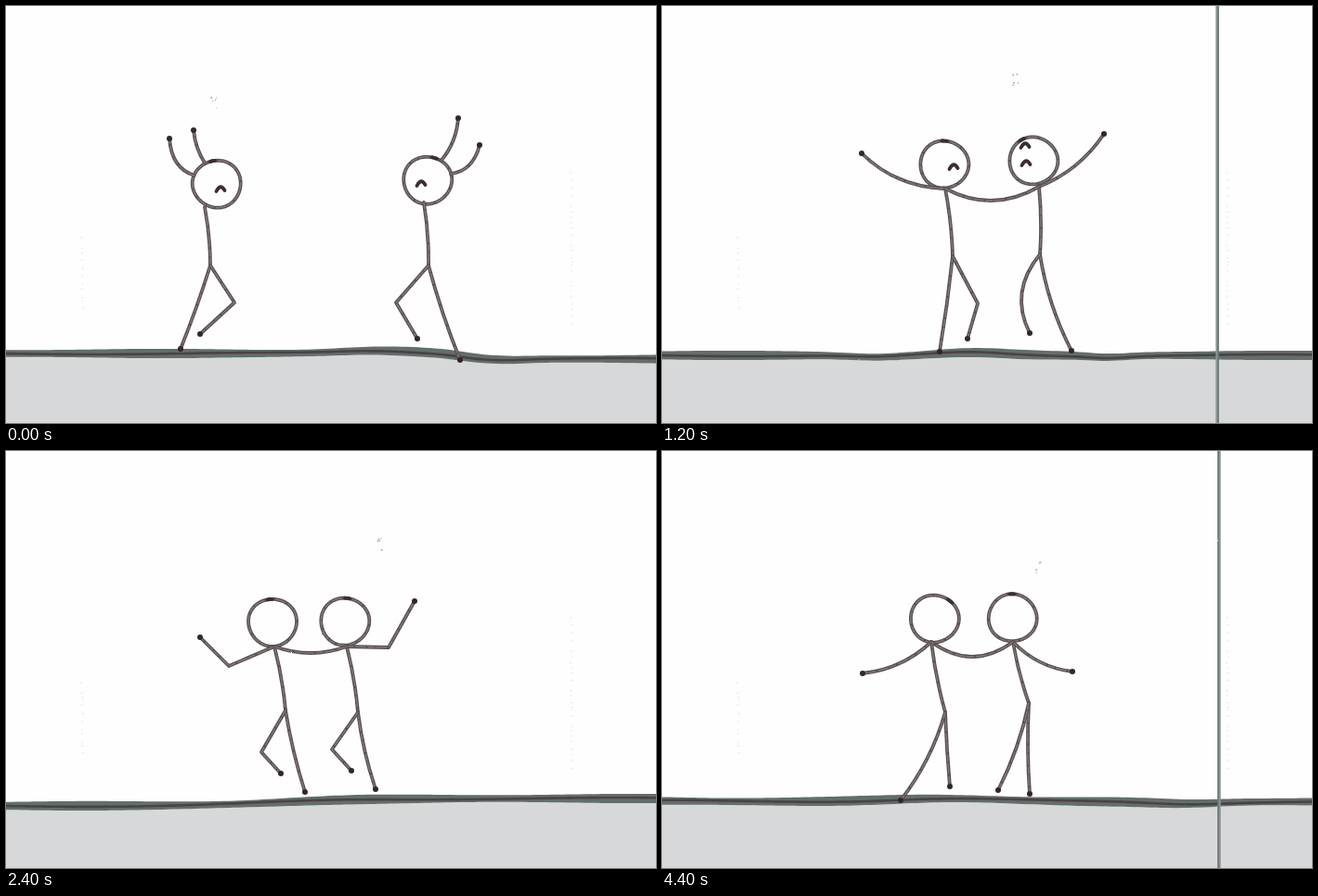
Animation of 700x450 px, one loop 4800 ms. Source, as an HTML page:

```html
<!DOCTYPE html>
<html lang="en">
<head>
<meta charset="utf-8">
<title>Stick figure dance</title>
<style>
html, body { margin: 0; width: 100%; height: 100%; overflow: hidden; background: #fefefe; }
svg { display: block; width: 700px; height: 450px; }
path { fill: none; stroke-linecap: round; stroke-linejoin: round; }
.ink { stroke: #584f50; stroke-width: 3.8; }
.core { stroke: #847d7b; stroke-width: 1.3; stroke-dasharray: 7 2 11 3; }
.dark { stroke: #3a2d31; stroke-width: 3.8; }
.dot { fill: #33282c; }
.soil { fill: #d7d8da; }
.band { fill: #626e6a; }
.seam { stroke: #4b4345; stroke-width: 2.6; }
.edge { stroke: #8b9594; stroke-width: 3.4; }
.rim { stroke: #626b6a; stroke-width: 1.2; }
.speck { fill: #a0a6a8; }
.scan { fill: #dcdcde; }
</style>
</head>
<body>
<svg id="stage" viewBox="0 0 700 450" xmlns="http://www.w3.org/2000/svg">
  <defs>
    <filter id="rough" filterUnits="userSpaceOnUse" x="-20" y="-10" width="740" height="480">
      <feTurbulence type="fractalNoise" baseFrequency="0.2" numOctaves="2" seed="4" result="n"/>
      <feDisplacementMap in="SourceGraphic" in2="n" scale="1.4" xChannelSelector="R" yChannelSelector="G"/>
    </filter>
  </defs>
</svg>
<script>
const STEP = 400, RX = 26, RY = 25.5, MIRROR = 694;
const stage = document.getElementById('stage');

let seed = 7;
const rand = (lo, hi) => {
  seed = (seed * 16807) % 2147483647;
  return lo + (hi - lo) * seed / 2147483647;
};

const path = (cls, d) => `<path class="${cls}" d="${d}"/>`;
const pen = d => path('ink', d) + path('core', d);
const dot = (cls, x, y, r) => `<circle class="${cls}" cx="${x}" cy="${y}" r="${r}"/>`;
const gap = (a, b) => Math.hypot(b[0] - a[0], b[1] - a[1]);
const aim = (a, b) => Math.atan2(b[1] - a[1], b[0] - a[0]);

// Sharp bends stay corners, gentle ones become one curve through b
function limb(a, b, c) {
  const turn = Math.abs(Math.sin((aim(b, c) - aim(a, b)) / 2));
  if (turn > Math.sin(21.5 * Math.PI / 180)) return pen(`M${a}L${b}L${c}`);
  const t = gap(a, b) / (gap(a, b) + gap(b, c)), s = 1 - t;
  const q = b.map((v, i) => (v - s * s * a[i] - t * t * c[i]) / (2 * s * t));
  return pen(`M${a}Q${q} ${c}`);
}

// Hand-drawn circle with a dark overlap where the pen started
function head([x, y]) {
  const start = rand(-2.4, -1.3), phase = rand(0, 6);
  const arc = (from, to) => {
    let d = '';
    for (let a = from; a <= to; a += 0.1) {
      const k = 1 + 0.015 * Math.sin(3 * a + phase);
      d += `${d ? 'L' : 'M'}${x + RX * k * Math.cos(a)} ${y + RY * k * Math.sin(a)}`;
    }
    return d;
  };
  return pen(arc(start, start + 6.35)) + path('dark', arc(start, start + 0.25));
}

// Low elbows hang from the neck, high ones from the side of the head
function shoulder({ head: h, neck }, elbow) {
  if (elbow[1] > h[1] + 10) return neck;
  const a = aim(h, elbow);
  return [h[0] + RX * Math.cos(a), h[1] + RY * Math.sin(a)];
}

function figure(f) {
  const { neck, hip } = f;
  const lean = [(neck[0] + hip[0]) / 2 + 1.5, (neck[1] + hip[1]) / 2];
  const limbs = [
    ...f.arms.map(([b, c]) => [shoulder(f, b), b, c]),
    ...f.legs.map(([b, c]) => [hip, b, c])
  ];
  const eye = ([x, y]) => path('dark', `M${x - 4.5} ${y + 3}Q${x} ${y - 6} ${x + 4.5} ${y + 2}`);
  return head(f.head) + limb(neck, lean, hip) + limbs.map(l => limb(...l)).join('') +
    limbs.map(l => dot('dot', ...l[2], 3)).join('') + (f.eyes || []).map(eye).join('');
}

// Level plus a soft step and a few swells
function ground({ y, step: [rise, at, soft], swells, seam }) {
  const mid = x => swells.reduce((s, [c, h, w]) => s + h * Math.exp(-(((x - c) / w) ** 2)),
    y + rise / (1 + Math.exp((at - x) / soft)));
  const half = x => 4.4 + 0.7 * Math.sin(x / 47 + y);
  const up = [], down = [], line = [];
  for (let x = -12; x <= 712; x += 6) {
    up.push([x, mid(x) - half(x)]);
    down.unshift([x, mid(x) + half(x)]);
    line.push([x, seam ? seam + Math.sin(x / 80) : mid(x) + Math.sin(x / 60)]);
  }
  return path('soil', `M${down.join('L')}L-12 475L712 475Z`) +
    path('band', `M${up.join('L')}L${down.join('L')}Z`) + path('seam', `M${line.join('L')}`);
}

function draw({ edge, land, pair: [a, b], sag, dust }) {
  let out = ground(land);
  if (edge) out += path('edge', `M${edge} -8V470`) + path('rim', `M${edge + 1} -8V470`);
  out += figure(a) + figure(b);
  if (sag) {
    const [p, q] = [a.neck, b.neck];
    out += limb(p, [(p[0] + q[0]) / 2, (p[1] + q[1]) / 2 + sag], q);
  }
  let specks = '';
  for (let i = 0; i < 5; i++) {
    specks += dot('speck', dust[0] + rand(-4, 4), dust[1] + rand(-7, 7), rand(0.5, 1));
  }
  return `<g filter="url(#rough)">${out}</g>${specks}`;
}

// Halfway pose of two scenes built alike
function mix(a, b) {
  if (typeof a === 'number') return (a + b) / 2;
  if (Array.isArray(a)) return a.map((v, i) => mix(v, b[i]));
  return Object.fromEntries(Object.keys(a).map(k => [k, mix(a[k], b[k])]));
}

const shift = (pts, dx, dy) => Array.isArray(pts[0])
  ? pts.map(p => shift(p, dx, dy)) : [pts[0] + dx, pts[1] + dy];

const apart = {
  land: { y: 375, step: [6, 490, 12], swells: [[400, -3, 60], [540, 1, 30]] },
  dust: [224, 105],
  pair: [{
    head: [227, 192], neck: [214, 217], hip: [220, 280], eyes: [[231, 197]],
    arms: [[[196, 180], [176, 143]], [[208, 158], [202, 134]]],
    legs: [[[205, 325], [188, 370]], [[246, 320], [209, 354]]]
  }, {
    head: [454, 188], neck: [450, 212], hip: [455, 280], eyes: [[447, 191]],
    arms: [[[479, 151], [487, 121]], [[490, 178], [510, 150]]],
    legs: [[[471, 333], [489, 382]], [[420, 320], [443, 359]]]
  }]
};

const clap = {
  land: { y: 379, step: [4, 640, 20], swells: [[420, 9, 85], [600, -4, 45]], seam: 373.5 },
  dust: [174, 42],
  pair: [{
    head: [277, 170], neck: [276, 194], hip: [281, 268], eyes: [[272, 175], [293, 167]],
    arms: [[[243, 181], [200, 149]], [[334, 122], [334, 97]]],
    legs: [[[271, 313], [238, 353]], [[290, 310], [305, 354]]]
  }, {
    head: [376, 167], neck: [373, 194], hip: [381, 262], eyes: [[366, 168], [387, 178]],
    arms: [[[334, 122], [334, 97]], [[404, 175], [454, 124]]],
    legs: [[[384, 321], [417, 349]], [[368, 310], [356, 352]]]
  }]
};

const meet = {
  edge: 598, sag: 14, dust: [382, 80],
  land: { y: 377, step: [0, 350, 20], swells: [[230, 2, 40], [335, -3, 50], [480, 2, 30]] },
  pair: [{
    head: [304, 171], neck: [305, 197], hip: [313, 270], eyes: [[314, 173]],
    arms: [[[250, 184], [215, 159]]],
    legs: [[[307, 320], [299, 373]], [[340, 321], [329, 359]]]
  }, {
    head: [400, 167], neck: [406, 195], hip: [407, 268], eyes: [[392, 169], [391, 150]],
    arms: [[[436, 179], [476, 138]]],
    legs: [[[420, 322], [441, 372]], [[387, 317], [396, 353]]]
  }]
};

const sway = {
  edge: 94, sag: 16, dust: [290, 121],
  land: { y: 374.5, step: [-1, 650, 20], swells: [[130, 2, 50], [390, -3.5, 90]] },
  pair: [{
    head: [316.5, 176], neck: [316, 202], hip: [299, 268],
    arms: [[[282, 226], [252, 234]]],
    legs: [[[300, 318], [298, 366]], [[313, 318], [332, 362]]]
  }, {
    head: [400.5, 177], neck: [404, 202], hip: [389, 278],
    arms: [[[440, 226], [478, 236]]],
    legs: [[[387, 318], [384, 358]], [[407, 325], [437, 373]]]
  }]
};

const lead = {
  head: [287, 185], neck: [289, 211], hip: [301, 280],
  arms: [[[240, 232], [209, 201]]],
  legs: [[[310, 325], [322, 368]], [[275, 325], [296, 348]]]
};
const follow = {
  head: shift(lead.head, 78, -1), neck: shift(lead.neck, 78, 0), hip: shift(lead.hip, 78, 2),
  arms: [[[412, 212], [440, 162]]],
  legs: shift(lead.legs, 76, -3)
};
const kick = {
  sag: 7, dust: [402, 101],
  land: { y: 383, step: [-8, 300, 45], swells: [] },
  pair: [lead, follow]
};

const scenes = { apart, closer: mix(apart, clap), clap, meet, sway, kick };
const sways = ['-kick', 'sway', 'kick', '-sway'];
const order = ['apart', 'closer', 'clap', 'meet', ...sways, ...sways];

// Faint dotted scan lines behind every scene
let scan = '';
for (const [x, top, end] of [[82, 250, 332], [609, 180, 350]]) {
  for (let y = top; y < end; y += rand(3, 12)) scan += dot('scan', x + rand(-1, 1), y, 0.7);
}

function layer(html) {
  const g = document.createElementNS('http://www.w3.org/2000/svg', 'g');
  g.innerHTML = html;
  return stage.appendChild(g);
}
layer(scan);

const shots = {};
for (const key of new Set(order)) {
  const name = key.replace('-', '');
  const g = shots[key] = layer(draw(scenes[name]));
  const drop = name === 'sway' ? 4 : 0;
  if (key !== name) g.setAttribute('transform', `translate(${MIRROR} ${drop}) scale(-1 1)`);
}

function render(ms) {
  const now = order[Math.floor(ms / STEP) % order.length];
  for (const key in shots) shots[key].style.display = key === now ? '' : 'none';
}

const t0 = performance.now();
function tick() {
  render(performance.now() - t0);
  requestAnimationFrame(tick);
}
tick();
</script>
</body>
</html>
```
